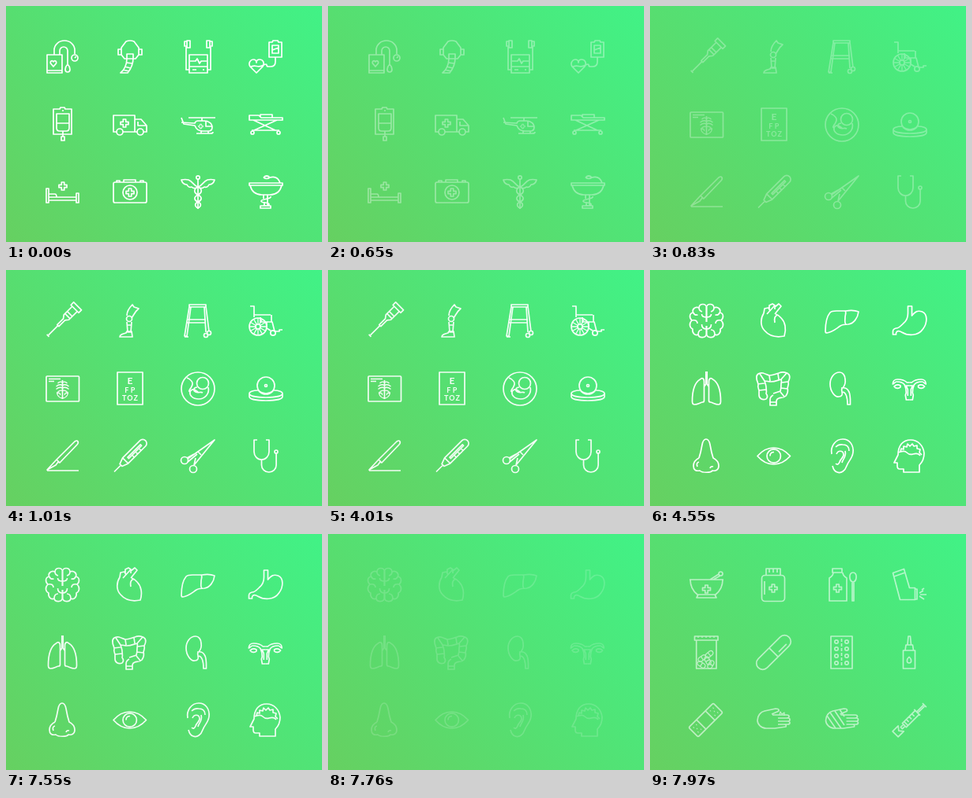
Write an HTML page that moves like this. It is 400x300 px and loops after 8 s.

```html
<!DOCTYPE html>
<html lang="en">
<head>
<meta charset="utf-8">
<title>Medical icons</title>
<style>
  html, body { margin: 0; width: 100%; height: 100%; overflow: hidden; }
  body { background: linear-gradient(47deg, #66d061, #41f286); }
  svg { display: block; width: 100%; height: 100%; }
  .set { fill: none; stroke: #fff; stroke-width: 1.7; stroke-linejoin: round; }
  .thin { stroke-width: 1.3; }
  text { fill: #fff; stroke: none; font-family: Lato, "Open Sans", sans-serif; font-weight: 700; text-anchor: middle; }
</style>
</head>
<body>
<svg viewBox="0 0 400 300">
  <defs>
    <path id="cross" d="M-1.7-5h3.4v3.3H5v3.4H1.7V5h-3.4V1.7H-5v-3.4h3.3z"/>
    <path id="wing" d="M241 229c-3-1-5-6-10-8q-4-1-9 0c1 4 4 6 7 6 1 3 4 4 6 3 2 2 4 2 6 1"/>
    <path id="snake" d="M241 229c8 3 8 8 2 11s-5 7 0 9 4 6 0 8"/>
    <path id="ribs" class="thin" d="M71.5 143q-3-2-6 1M71.5 146.5q-4-2-8 1.5M71.5 150q-4-2-8 1.5M71.5 153.5q-3-1-6 1.5M71.5 163q-6-.5-7-7 5 0 4 3"/>
    <path id="hemisphere" d="M71.5 66V48c0-6-9-6-9.500 0-5-2-9 2-7.500 6-5 1-5 7-1.500 10-4 4-3 9 1 11-1 5 3 9 7 7 1 5 10 5 10.500-1V71M62 48q0 4 4 5M54.500 54q2 4 6 3M53 64c5-1 7 1 7 4M71.500 60q-6 0-6-4M71.500 75q-6 0-6-6M61 82c0-4 2-6 5-6"/>
    <path id="lung" d="M70.800 129v16l-2 3M68.500 166v-24c0-5-3-5-5-3-7 4-10 14-10 28q0 4 3 4c4 0 6-2 10-3q2 0 2-2z"/>
    <path id="tube" d="M328.300 143h-3c-3-3-8-4-12-4-4 0-6 3-6 6 2-1 3-3 5-3 5 0 8 1 10 4 2 4 2 7 2 10l-1 3 1 6h4M317 147c-3-2-6-1-8 1 2 3 6 3 8 1zM328.300 147h-4l2 5v8"/>
    <path id="hand" d="M155 230h18q3 0 3 2t-3 2h-11M163 234h12q2 0 2 2t-2 2h-13M163 238h11q3 0 3 2t-3 2h-12M162 242h8q3 0 2 3l-14 2h-11c-6 0-11-5-11-10 0-6 4-11 9-12l14-3c5 0 5 3 2 4l-7 3"/>
    <g id="pill"><rect x="-5.500" y="-2.800" width="11" height="5.600" rx="2.800"/><path d="M0-2.800v5.600"/></g>
  </defs>

  <g class="set">
    <!-- blood pressure cuff, oxygen mask, defibrillator, transfusion -->
    <path d="M52 62h19v23H52zM52 82h19M61 62v-6a13 12 0 0 1 26 0v5M68 62v-5a5 5 0 0 1 10 0v17M78 74c-4 4-4 10 0 10s4-6 0-10M87 66l2-2M60 77l-3.500-4c-1-4 3-4 3.500-2 .5-2 4.500-2 3.500 2z"/>
    <circle cx="87" cy="66" r="4"/>
    <path d="M153 67h-3l-4-5v-9l6-8q5-2 10 0l6 8v9l-4 5h-3M146 55h-4v7h4M168 55h4v7h-4M153 61h8v5c0 8-3 14-7 19h-9c5-4 8-11 8-19zM153 67h8M152 72l8 1M150 77l8 2M148 81l8 2"/>
    <path d="M229 44h4v9h-4zM229 45h-3v6h3M258 44h-4v9h4zM258 45h3v6h-3M228 52v29h4M259 52v29h-4M232 62h23v23h-23zM232 77h23M233 70h7l2-3 3 6 2-3h7M236 81h5M249 81h2"/>
    <path d="M333 46h4l1-2h6l1 2h4v19h-16zM337 50h8v10h-8zM337 56l8-3M341 65v6q0 6-6 6h-3q-2 0-2-2t-4 0M317 85l-8-8c-3-5 1-9 4-9q4 0 4 4 0-4 4-4c4 0 7 4 4 9zM309 78c6-5 10 2 17-3"/>
    <!-- drip, ambulance, helicopter, stretcher -->
    <path d="M60 131h8l1-2h5l1 2h8v32H60zM64 137h16v18q0 4-4 4h-8q-4 0-4-4zM64 149h16M72 159v7M70 166h4v5h-4zM71 133h2"/>
    <path d="M140 160h-4v-21h27v21h-15M163 144h8l7 8v8h-4M166 160h-3M167 147v5h10"/>
    <circle cx="144" cy="160" r="4"/><circle cx="170" cy="160" r="4"/>
    <use href="#cross" x="150" y="149"/>
    <path d="M231 142h34M248 142v4M222 142l3 8 14 2c2 5 5 7 10 7h7q5 0 5-5c0-5-5-8-10-8h-8q-3 0-4 3l-17-1M253 147v6h8M247 159v3M256 159v3M241 162h18q3 0 3-2"/>
    <use href="#cross" transform="translate(246.500 153) scale(.55)"/>
    <path d="M308 139h12l3 3h27v3h-42zM322 141v-3h15v4M313 145l28 13M343 145l-29 13M311 158h35"/>
    <circle cx="312" cy="161" r="2"/><circle cx="345" cy="161" r="2"/>
    <!-- bed, kit, caduceus, bowl -->
    <path d="M51 232h3v18h-3zM89 238h3v12h-3zM54 243h35v4H54zM54 239h8q2 0 2 4"/>
    <use href="#cross" x="72" y="229"/>
    <rect x="136" y="224" width="42" height="26" rx="2"/>
    <path d="M149 224v-3h15v3M140 224v-2h4v2M170 224v-2h4v2"/>
    <circle cx="157" cy="237" r="9"/><use href="#cross" x="157" y="237"/>
    <circle cx="243" cy="218" r="2.200"/><path d="M243 220v38"/>
    <use href="#wing"/><use href="#wing" transform="matrix(-1 0 0 1 486 0)"/>
    <use href="#snake"/><use href="#snake" transform="matrix(-1 0 0 1 486 0)"/>
    <path d="M308 225h42v3h-42zM309 228c2 8 7 12 15 12h10c8 0 13-4 15-12M326 240v5M331 240v14M327 254v-5M322 254h13v3h-13zM335 242c1 4-12 3-12 6s10 1 10 4-5 2-7 1M326 218q4-4 8 0-4 3-8 0M334 218c7-2 11 1 13 7"/>
  </g>

  <g class="set">
    <!-- crutch, prosthesis, walker, wheelchair -->
    <g transform="translate(71.500 65) rotate(45)">
      <path d="M-7-27H7v5H-7zM-4.500-22v15l3 4V8h3V-3l3-4v-15M-4.500-13h9M-4.500-9h9M0 8v17M-2 26h4"/>
    </g>
    <path d="M153 58c0-5 3-10 7-14l2 3 6 2c-5 4-6 8-9 12M153 66l1 13h4l1-13M154 70h4M144 85c0-3 4-4 8-5l1-2h6l1 7z"/><circle cx="156" cy="62" r="3.500"/>
    <path d="M232 44h21v3h-21zM232 47l-6 37h3l5-37M251 47l2 32M253 46l4 32M230 63h23M229 67h24M226 85h5"/>
    <circle cx="253" cy="83" r="2.500"/><circle cx="257" cy="80" r="2.500"/>
    <path d="M309 46h5v14M314 57h6M320 57h15M322 60v6h14v-9M322 66h15l3 12h6v-2h4M330 66v8l5 3"/>
    <circle cx="319" cy="72" r="11"/><circle cx="319" cy="72" r="3"/><circle cx="338" cy="80" r="3.200"/>
    <path id="spokes" class="thin"/>
    <!-- scan, eye chart, fetus, head mirror -->
    <rect x="51" y="135" width="41.500" height="32" rx="1"/>
    <path d="M54 138.500h15M54 141.500h7M71.500 140v24"/>
    <use href="#ribs"/><use href="#ribs" transform="matrix(-1 0 0 1 143 0)"/>
    <path d="M141 130h32v41h-32z"/>
    <text x="157" y="145" font-size="12">E</text>
    <text x="158" y="156" font-size="9" letter-spacing="2.500">FP</text>
    <text x="157.500" y="166" font-size="9" letter-spacing="1">TOZ</text>
    <circle cx="243" cy="151" r="21"/><circle cx="249" cy="144" r="7.500"/>
    <path d="M256 149c2 8-4 15-12 15-8 0-12-5-11-9 1-3 4-4 7-2l3 2M229 137c5 2 9 6 6 11-1 3-4 4-3 7M242 149c-4 0-6 4-2 6s6-1 9 1"/>
    <circle cx="329" cy="147" r="11"/><circle cx="329" cy="147" r="1.500"/>
    <path d="M319 153c-7 0-11 2-11 4 0 3 9 5 21 5s21-2 21-5c0-2-4-4-11-4M308 157v4c0 3 9 5 21 5s21-2 21-5v-4M320 154q9 6 18 0"/>
    <!-- scalpel, thermometer, forceps, stethoscope -->
    <path d="M52 255h40M52 254l12-13 23-23q3-2 4 0t-1 4l-22 23-2-1-3 4zM64 241l4 4"/>
    <g transform="translate(157.500 236) rotate(45)"><path d="M-5-22a5 5 0 0 1 10 0V9L2 17h-4l-3-8zM0 17v12M-5 9H5M-1-19V4h2v-23zM2-14h3M2-8h3M2-2h3"/></g>
    <circle cx="226" cy="242" r="4.500"/><circle cx="237" cy="253" r="4.500"/>
    <path d="M230 240l34-24-26 32M229 239l9-5M238 248l2-9M243 231l4 4M230 244l12-10"/>
    <path d="M318 216h-4v15a9.500 10 0 0 0 19 0v-15h-4M323.500 241v7a9.300 9 0 0 0 18.600 0v-15"/><circle cx="342" cy="231" r="2"/>
  </g>

  <g class="set">
    <!-- brain, heart, liver, stomach -->
    <use href="#hemisphere"/><use href="#hemisphere" transform="matrix(-1 0 0 1 143 0)"/>
    <path d="M144 55c-4 6-5 16 1 22 6 7 15 9 25 7 3-9 1-18-4-23-2-3-4-4-7-5M144 55l1-6 5-1 2 4M148 56l10-11M151 49v-4l4-2 3 2v5M158 47l5-4 3 3-8 10M158 67c-1-5 0-9 4-10"/>
    <path d="M222 78c0-9 1-18 6-24 2-2 5-2 8-2h12c6-1 11-1 16 1-1 8-6 15-13 16-4 0-7 0-10 2-6 4-10 8-17 9q-2 0-2-2zM247 52c2 2 0 5 0 8s-1 7 1 9"/>
    <path d="M326.500 46v9c0 6-2 10-6 13-3 3-5 6-9 6q-4 1-4 4v4h4v-2c1-3 4-3 7-1 8 5 21 5 27-4 6-8 6-19-1-22-6-2-9 0-13 5V46z"/>
    <!-- lungs, bowel, kidney, womb -->
    <use href="#lung"/><use href="#lung" transform="matrix(-1 0 0 1 143 0)"/>
    <path d="M147 164c-5 2-9-1-9-5v-6c-1-3-2-5-1-7 0-3-2-5-2-8-1-5 3-8 8-7 3 1 5 2 8 3 5 0 8-2 12-3 5-2 11-1 13 2 2 4 0 7-1 9 1 3 0 5-1 8 1 3 0 7-2 10-3 3-7 2-9 3q-3 1-3 4v5h-8v-7c0-3 2-5 4-6M147 164q3-3 0-7c1-3 0-5 0-8 0-2-1-5-2-8 3 0 5 1 8 1 5 0 9-2 13-3 1 2 0 4 0 6 0 3 0 6-1 9-3 1-6 2-9 3M136 145l9-1M138 153l9-1M151 134l1 7M162 132l1 7M167 143l8-1M166 150l8 1M165 155l5 6M152 168h8M139 132l6 9M166 139l7-8"/>
    <path d="M240 130c-7 0-12 7-12 15 0 9 6 17 11 16 4 0 5-3 4-6 0-2-1-3 0-4 3-3 5-7 4-12 0-5-3-9-7-9zM242 150c6-1 8 1 10 5 2 5 1.500 10 1.500 16H250c0-8-1-15-6-16"/>
    <use href="#tube"/><use href="#tube" transform="matrix(-1 0 0 1 656.600 0)"/>
    <!-- nose, eye, ear, head -->
    <path d="M62 239c2-6 3-11 4-17 1-5 3-7 5-7s4 2 5 7c1 6 2 11 4 17 4 2 7 5 7 10 0 5-4 7-8 6-2 3-13 3-16 0-5 1-8-1-8-6s3-8 7-10M60 250q-2-5 2-6M76 252q1-3 4-2"/>
    <path d="M136 236.500c12-14 29-14 41.500 0-12.500 14-29.500 14-41.500 0z"/><circle cx="156.700" cy="236.500" r="8.700"/><path d="M152 236.500q0-5 5-5"/>
    <path d="M230 234c-2-10 5-19 14-19s14 8 13 17c-1 8-6 11-8 17-2 6-7 10-12 8-4-1-5-4-6-8M235 225q4-4 9-3c5 0 8 3 8 8M236 234c2-5 8-5 9 0 1 4-4 6-5 10-1 3-3 4-5 2M247 230c2 8-3 10-4 15"/>
    <path d="M321 257v-4h-5q-3 0-3-4v-4h-4l5-10c0-12 6-19 16-19 9 0 16 7 17 17 0 7-3 12-6 15v9zM314 232c5-2 9-2 11 0s5 3 8 2 7-1 9 2M317 231l1-4 3 1v-4l4 1 1-4 3 3 3-3 2 3 4-1v4l4 1-1 4 3 3"/>
  </g>

  <g class="set">
    <!-- mortar, jar, syrup, inhaler -->
    <path d="M50 58h43M51 58c0 9 4 15 9 19h23c5-4 9-10 9-19M61 77l-2 4h25l-2-4M76 58l11-7M80 58l9-5"/><circle cx="89.500" cy="50.500" r="2.500"/>
    <use href="#cross" x="71.500" y="70"/>
    <rect x="141.500" y="52.500" width="29" height="33" rx="4"/><path d="M147 52v-8h18v8M151 44v5M156 44v5M161 44v5M145 60v17"/>
    <use href="#cross" x="156" y="69"/>
    <path d="M231 44h12v5h-12zM232 49q0 4-5 7v29h22V56q-5-3-5-7M257 49c-6 0-5 11 0 12 5-1 6-12 0-12zM256 61h2v24h-2z"/>
    <use href="#cross" x="237.500" y="69"/>
    <path d="M307.500 49.500l14-5 7 24h7v15h-19zM309 54l14-5M335 70h3v13h-3M341 75l5-3M342 77h8M341 79l6 4M344 71l3-2"/>
    <!-- pill jar, capsule, blister, nasal spray -->
    <path d="M56.500 130h29.500v5H56.500zM58.700 135v36h25.300v-36"/>
    <path class="thin" d="M61 130v2M66 130v2M71 130v2M76 130v2M81 130v2"/>
    <g class="thin">
      <use href="#pill" transform="translate(65 166) rotate(35)"/><use href="#pill" transform="translate(77 166) rotate(-60)"/>
      <use href="#pill" transform="translate(66 158) rotate(-35)"/><use href="#pill" transform="translate(73 161) rotate(60)"/>
      <use href="#pill" transform="translate(75 153) rotate(-40)"/>
    </g>
    <g transform="translate(156.500 150.500) rotate(45)"><rect x="-8" y="-27.500" width="16" height="55" rx="8"/><path d="M-8 0H8M4-19V-5"/></g>
    <path d="M229 130h27v41h-27z"/><path d="M242.500 133v36" stroke-dasharray="4 2"/>
    <g id="blisters"></g>
    <path d="M326 141l1-11h2.500l1 11M323 148l1-7h8.500l1 7M320.500 148h15v23h-15zM328 156c-4 4-3 8 0 8s4-4 0-8"/>
    <!-- plaster, hands, syringe -->
    <g transform="translate(70.500 236.500) rotate(-45)"><rect x="-22" y="-8.500" width="44" height="17" rx="2"/><path d="M-8-8.500v17M8-8.500v17"/><path d="M-18-4h1M-13-4h1M-18 4h1M-13 4h1M-16 0h1M12-4h1M17-4h1M12 4h1M17 4h1M15 0h1"/></g>
    <use href="#hand"/><path class="thin" d="M164 230l1-4 2 3 3-2v4"/>
    <use href="#hand" x="86.500"/><path d="M224 231l11 16M228 227l14 20M234 225l12 18M240 223l6 9"/>
    <g transform="translate(329 236) rotate(45)"><path d="M-3.500-13h7V10h-7zM-1-13v-12M1-13v-12M-3.500-26h7M-5.500-13h11M-1.500 10v5h3v-5M-3.500-7H1M-3.500-2H1M-3.500 3H1M-3.500 7h7M-5 16l5 4 5-4v10H-5z"/></g>
  </g>
</svg>
<script>
const LOOP = 8000, STEP = 30;
const sets = [...document.querySelectorAll('.set')];
// start time and step count of each fade between neighbouring sets
const fades = [[500, 18], [4010, 18.5], [7550, 18.5]];

const spokes = Array.from({ length: 12 }, (_, i) => {
  const a = i * Math.PI / 6, x = Math.cos(a), y = Math.sin(a);
  return `M${319 + 3 * x} ${72 + 3 * y}L${319 + 11 * x} ${72 + 11 * y}`;
});
document.getElementById('spokes').setAttribute('d', spokes.join(''));

document.getElementById('blisters').innerHTML = Array.from({ length: 8 }, (_, i) =>
  `<circle cx="${i % 2 ? 249 : 236}" cy="${137 + (i >> 1) * 9}" r="2.2"/>`).join('');

function draw(t) {
  const alpha = [1, 0, 0, 0];
  fades.forEach(([start, steps], i) => {
    if (t < start) return;
    const p = Math.min(1, (Math.floor((t - start) / STEP) + 0.7) / steps);
    alpha[i] = Math.max(0, 1 - 2 * p);
    alpha[i + 1] = Math.max(0, 2 * p - 1);
  });
  sets.forEach((set, i) => set.setAttribute('opacity', alpha[i]));
}

const origin = performance.now();
function tick() {
  draw((performance.now() - origin) % LOOP);
  requestAnimationFrame(tick);
}
tick();
</script>
</body>
</html>
```
